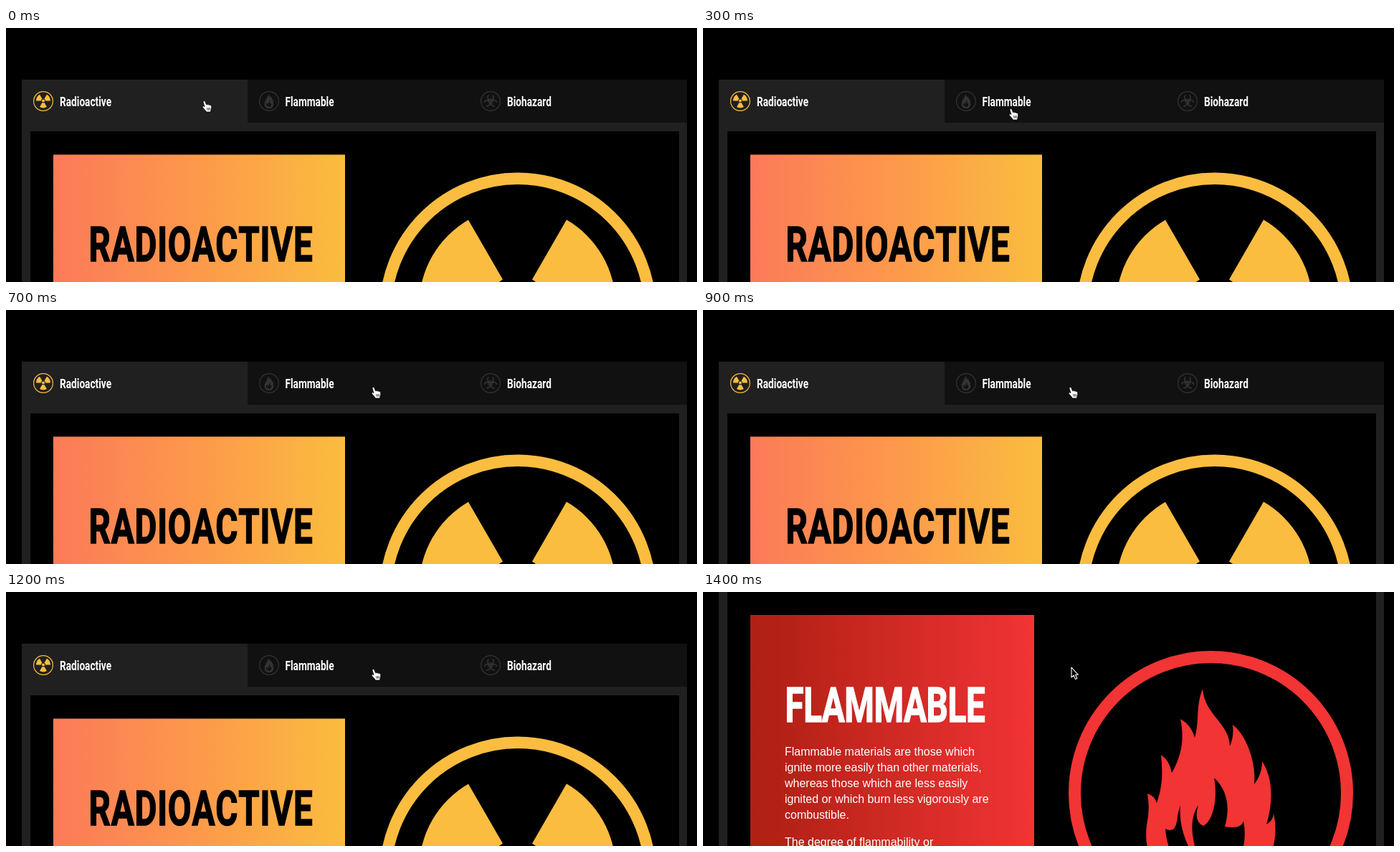
Write an HTML page that moves like this. It is 964 px wide and 354 px high and loops after 2 s.

```html
<!DOCTYPE html>
<html lang="en">
<head>
<meta charset="utf-8">
<title>Hazard tabs</title>
<style>
  html, body { margin: 0; width: 100%; height: 100%; overflow: hidden; background: #000; }
  svg { display: block; width: 964px; height: 354px; }

  .tab { font: 700 18px Roboto, sans-serif; fill: #fff; }
  .title { font: 700 67px Roboto, sans-serif; font-kerning: none; stroke-width: 1.5px; }
  .dark { fill: #000; stroke: #000; letter-spacing: 1.1px; }
  .light { fill: #fff; stroke: #fff; letter-spacing: -.5px; }
  .copy { font: 16px "Liberation Sans", Arial, sans-serif; fill: #fff; }

  .yellow { color: #fbbd40; }
  .red { color: #f23434; }
  .dim { color: #343434; }

  #radioactive, #flammable, #hand, #arrow { animation: 2s step-end infinite; }
  #radioactive { animation-name: leave; }
  #flammable { animation-name: enter; }
  #hand { animation-name: move, drop; }
  #arrow { animation-name: point; }

  @keyframes leave { 0% { visibility: visible } 65%, 100% { visibility: hidden } }
  @keyframes enter { 0% { visibility: hidden } 65%, 100% { visibility: visible } }
  @keyframes drop { 0% { visibility: visible } 70%, 100% { visibility: hidden } }
  @keyframes point { 0% { visibility: hidden } 70%, 100% { visibility: visible } }
  @keyframes move {
    0% { transform: translate(274px, 101px) }
    5% { transform: translate(313px, 104px) }
    10% { transform: translate(373px, 109px) }
    15% { transform: translate(427px, 112px) }
    20% { transform: translate(472px, 111px) }
    25% { transform: translate(499px, 108px) }
    30%, 100% { transform: translate(510px, 107px) }
  }
</style>
</head>
<body>
<svg viewBox="0 0 964 354" width="964" height="354">
  <defs>
    <linearGradient id="amber">
      <stop offset="0" stop-color="#fb7a59"/>
      <stop offset=".5" stop-color="#fd994b"/>
      <stop offset="1" stop-color="#fabd3f"/>
    </linearGradient>
    <linearGradient id="crimson">
      <stop offset="0" stop-color="#b02014"/>
      <stop offset=".1" stop-color="#b32116"/>
      <stop offset="1" stop-color="#f23434"/>
    </linearGradient>

    <path id="blade" d="M-20.5-35.5-68.5-118.6A137 137 0 0 0-137 0H-41A41 41 0 0 1-20.5-35.5Z"/>
    <g id="trefoil" fill="currentColor">
      <circle r="184.75" fill="none" stroke="currentColor" stroke-width="16.5"/>
      <g transform="translate(-.5 -8.5)">
        <circle r="27"/>
        <use href="#blade"/>
        <use href="#blade" transform="rotate(120)"/>
        <use href="#blade" transform="rotate(240)"/>
      </g>
    </g>

    <g id="fire">
      <circle r="190" fill="none" stroke="currentColor" stroke-width="17"/>
      <path transform="translate(-708.5 -280.5)" fill="currentColor" fill-rule="evenodd" d="
        M697 135C700 172 734 182 735 215Q741 201 739 185C758 199 772 238 769 268Q780 254 780 236
        C796 260 795 295 786 324Q795 319 796 309C804 342 794 388 752 418Q708 432 664 418
        C630 396 614 362 619 325Q624 302 620 281Q630 284 633 294C642 268 641 250 639 227
        Q651 235 654 252C670 224 671 200 666 177Q681 185 686 203C693 180 687 160 697 135Z
        M645 330Q658 337 661 320Q662 308 666 297C664 320 670 338 677 354Q684 378 694 392
        C664 388 648 366 645 330Z
        M691 297C680 314 681 334 686 354Q692 382 708 396C742 392 762 362 754 319
        Q751 331 728 327C736 300 731 275 713 259C718 285 713 318 698 326Q684 320 691 297Z"/>
    </g>

    <path id="horn" d="M-2.6-8.4A4.1 4.1 0 1 0 2.6-8.4"/>
    <g id="bio" fill="none" stroke="currentColor" stroke-width="1.6">
      <circle r="13.4" stroke-width="1.2"/>
      <circle r="3.4" stroke-width="1"/>
      <use href="#horn"/>
      <use href="#horn" transform="rotate(120)"/>
      <use href="#horn" transform="rotate(240)"/>
    </g>
  </defs>

  <rect width="964" height="354"/>

  <g id="radioactive">
    <path fill="#202020" d="M22 72H950V354H22Z"/>
    <path fill="#111" d="M337 72H950V132H337Z"/>
    <path d="M34 144H939V354H34Z"/>

    <use href="#trefoil" class="yellow" transform="translate(52 102) scale(.0725)"/>
    <use href="#fire" class="dim" transform="translate(367 102) scale(.0705)"/>
    <use href="#bio" class="dim" transform="translate(676 102)"/>
    <g class="tab">
      <text transform="translate(75 109) scale(.76 1)">Radioactive</text>
      <text transform="translate(389.5 109) scale(.76 1)">Flammable</text>
      <text transform="translate(699 109) scale(.76 1)">Biohazard</text>
    </g>

    <path fill="url(#amber)" d="M66 176.5H473V354H66Z"/>
    <text class="title dark" transform="translate(115.5 325.3) scale(.71 1)">RADIOACTIVE</text>
    <use href="#trefoil" class="yellow" transform="translate(714 394.5)"/>
  </g>

  <g id="flammable">
    <path fill="#202020" d="M22 0H34V354H22ZM939 0H950V354H939Z"/>
    <path fill="url(#crimson)" d="M66 32H462V354H66Z"/>
    <text class="title light" transform="translate(114.5 180.7) scale(.71 1)">FLAMMABLE</text>
    <text class="copy" y="228">
      <tspan x="114">Flammable materials are those which</tspan>
      <tspan x="114" dy="22">ignite more easily than other materials,</tspan>
      <tspan x="114" dy="22">whereas those which are less easily</tspan>
      <tspan x="114" dy="22">ignited or which burn less vigorously are</tspan>
      <tspan x="114" dy="22">combustible.</tspan>
      <tspan x="114" dy="38">The degree of flammability or</tspan>
    </text>
    <use href="#fire" class="red" transform="translate(708.5 280.5)"/>
  </g>

  <g id="hand" stroke="#000" stroke-linejoin="round">
    <path fill="#fff" stroke-width=".8" d="M1 2.2Q.8.4 2.4.4 3.5.4 4 1.8L5.6 5.8Q6.6 4.8 7.8 6 9 5 10 6.4
      12 5.8 12.6 7.8 13.3 10.5 12 13L11.6 16H5.4Q4.4 13.8 2.2 11.8L.2 9.4Q-.2 7.6 1.6 7.8L3 8.8Z"/>
    <path fill="none" stroke-width=".7" d="M6.6 10 7 13.6M8.6 10V13.6M10.4 10 10.2 13.6"/>
  </g>
  <path id="arrow" fill="#000" stroke="#fff" stroke-width="1.1" stroke-linejoin="round"
    d="M514 105V119L517.2 116.2 519.5 121.4 521.8 120.4 519.6 115.3H523.4Z"/>
</svg>
</body>
</html>
```
